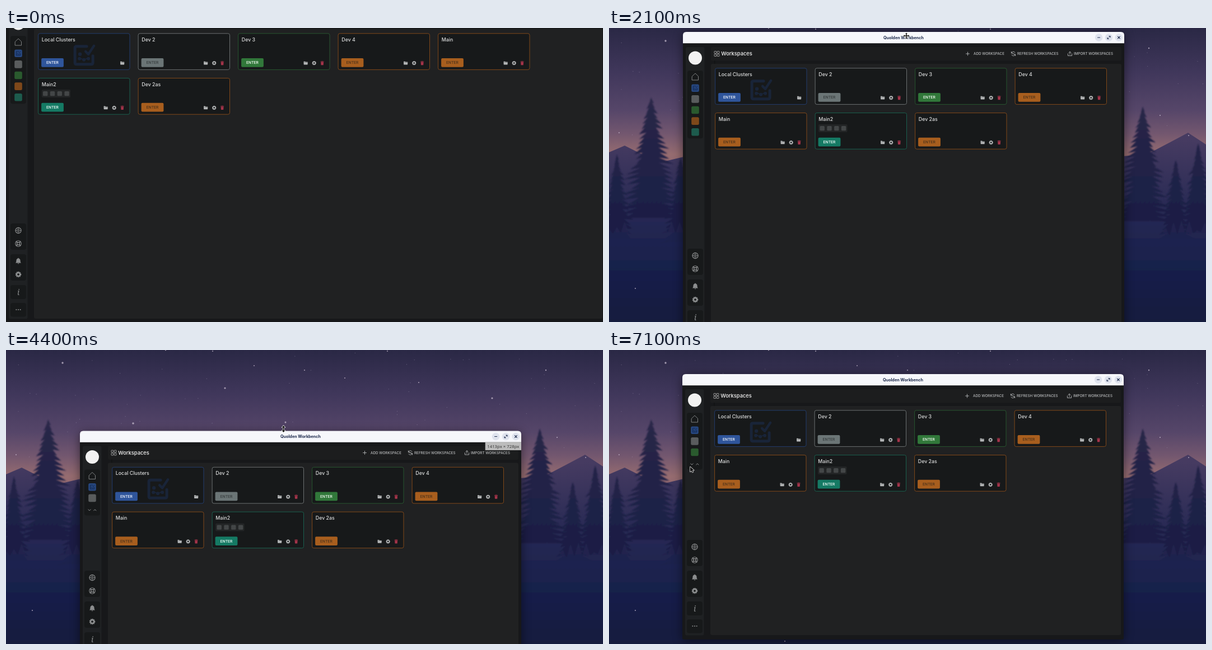
An HTML page for the animation above (8000 ms loop, 1066 by 525 pixels).

```html
<!DOCTYPE html>
<html lang="en">
<head>
<meta charset="utf-8">
<title>Workspaces</title>
<style>
html, body { margin: 0; width: 100%; height: 100%; overflow: hidden; background: #161718; }
svg { display: block; width: 100vw; height: 100vh; }
text { font-family: Inter, sans-serif; white-space: pre; }
</style>
</head>
<body>
<svg viewBox="0 0 1066 525" preserveAspectRatio="none">
  <defs>
    <linearGradient id="sky" x2="0" y2="1">
      <stop offset="0" stop-color="#2a2845"/>
      <stop offset=".15" stop-color="#40375b"/>
      <stop offset=".28" stop-color="#564669"/>
      <stop offset=".36" stop-color="#73576f"/>
      <stop offset=".43" stop-color="#966c70"/>
      <stop offset=".5" stop-color="#8c6570"/>
    </linearGradient>
    <linearGradient id="hill" gradientUnits="userSpaceOnUse" x1="0" y1="200" x2="0" y2="525">
      <stop offset="0" stop-color="#463b61"/>
      <stop offset=".35" stop-color="#2a2b55"/>
      <stop offset=".65" stop-color="#1a214d"/>
      <stop offset="1" stop-color="#121a3e"/>
    </linearGradient>
    <linearGradient id="pine" gradientUnits="userSpaceOnUse" x1="0" y1="125" x2="0" y2="480">
      <stop offset="0" stop-color="#2a2748"/>
      <stop offset=".5" stop-color="#1d2046"/>
      <stop offset="1" stop-color="#141b42"/>
    </linearGradient>
    <filter id="soft"><feGaussianBlur stdDeviation=".9"/></filter>
    <filter id="shade" x="-10%" y="-10%" width="120%" height="120%"><feGaussianBlur stdDeviation="9"/></filter>
  </defs>
  <g id="back"></g>
  <g id="scene"></g>
</svg>
<script>
const LOOP = 8000, W = 788, BOTTOM = 572, FULL_W = 1070, FULL_H = 582;
const lerp = (a, b, p) => a + (b - a) * p;

// Markup helpers
const rect = (x, y, w, h, fill, r = 0, more = '') =>
  `<rect x="${x}" y="${y}" width="${w}" height="${h}" rx="${r}" fill="${fill}" ${more}/>`;
const text = (x, y, s, size, fill, weight = 500, more = '') =>
  `<text x="${x}" y="${y}" font-size="${size}" fill="${fill}" font-weight="${weight}" ${more}>${s}</text>`;
const at = (x, y, body) => `<g transform="translate(${x} ${y})">${body}</g>`;
const disc = (x, y, r, fill, more = '') => `<circle cx="${x}" cy="${y}" r="${r}" fill="${fill}" ${more}/>`;
const line = (d, color, w = 1) =>
  `<path d="${d}" fill="none" stroke="${color}" stroke-width="${w}" stroke-linecap="round" stroke-linejoin="round"/>`;
const shape = (d, fill, more = '') => `<path d="${d}" fill="${fill}" ${more}/>`;
const ring = (r, color, w, more = '') => disc(0, 0, r, 'none', `stroke="${color}" stroke-width="${w}" ${more}`);

function random(seed) {
  return () => (seed = (seed * 16807) % 2147483647) / 2147483647;
}

// Backdrop
function pine(x, top, h, half, rnd) {
  const n = Math.round(h / 9), left = [], right = [];
  for (let i = 1; i <= n; i++) {
    const reach = half * Math.pow(i / n, .8), y = top + h * i / n;
    const a = reach * (.75 + .4 * rnd()), b = reach * (.75 + .4 * rnd());
    right.push(`${x + a} ${y + 2}`, `${x + b * .5} ${y}`);
    left.unshift(`${x - a * .5} ${y}`, `${x - b} ${y + 3}`);
  }
  return shape(`M${x} ${top}L${right.join(' ')} ${left.join(' ')}Z`, 'url(#pine)');
}

function backdrop() {
  const rnd = random(41);
  let s = rect(0, 0, 1066, 525, 'url(#sky)');
  s += shape('M0 222L28 210 60 226 100 238 150 226V525H0ZM150 230H900L960 226 1000 205 1034 187 1066 208V525H150Z', 'url(#hill)');
  let wood = 'M0 525V290';
  for (let x = 0; x <= 1066; x += 9) wood += `L${x} ${283 + 22 * rnd()}L${x + 5} ${302 + 10 * rnd()}`;
  let trees = shape(wood + 'V525Z', 'url(#hill)');
  for (const [x, y, h, w] of [[14, 226, 150, 34], [75, 124, 215, 58], [128, 232, 150, 36],
    [953, 140, 205, 54], [1012, 236, 140, 34], [1052, 206, 160, 38]]) trees += pine(x, y, h, w, rnd);
  let shore = 'M0 525V352';
  for (let x = 0; x <= 1066; x += 14) shore += `L${x} ${340 + 24 * rnd()}L${x + 7} ${362 + 10 * rnd()}`;
  trees += shape(shore + 'V525Z', 'url(#hill)', 'opacity=".75"');
  s += `<g filter="url(#soft)">${trees}</g>`;
  const stars = [[101, 23, 1.7], [391, 68, 1.6], [227, 131, 1.8], [868, 86, 1.6], [964, 36, 1.2], [285, 0, 1.2],
    [533, 36, 1.1], [499, 129, 1.5], [605, 50, 1], [443, 28, 1], [737, 58, 1.1], [47, 465, 1.1],
    [169, 283, 1], [18, 187, 1], [984, 156, 1.1], [1035, 192, 1], [314, 520, 1.1], [681, 2, 1], [369, 2, 1]];
  for (const [x, y, r] of stars) s += disc(x, y, r, '#c9bdd0', 'opacity=".75"');
  for (let i = 0; i < 60; i++) s += disc(1066 * rnd(), 200 * rnd(), .6, '#b9aec8', 'opacity=".4"');
  return s;
}

// Icons, centred on 0,0
const GREY = '#8b8d8e', PALE = '#b4b6b7';
const folder = shape('M-3.6-2.9h2.6l.9.9h3.7v.8h-7.2zM-3.7-.9h7.5l-.4 3.8h-6.7z', PALE);
const cog = (r, w, color) => ring(r, color, w) + ring(r + w * .55, color, w * .6, `stroke-dasharray="${r * .55} ${r * .4}"`);
const trash = shape('M-3-3.1h1.8l.4-.6h1.6l.4.6H3v1h-6zM-2.5-1.6h5L2.1 3.7h-4.2z', '#a5344a');
const home = line('M-5.5-.8L0-6 5.5-.8V6h-11z', GREY, .9);
const brain = ring(5.1, GREY, 1.1) + line('M0-5V5M-4.8 0h3M1.8 0h3M-2.6-2.8l1.4 1.4M2.6-2.8L1.2-1.4M-2.6 2.8l1.4-1.4M2.6 2.8L1.2 1.4', GREY);
const helm = ring(5.2, GREY, 1.1) + ring(2.4, GREY, 1.1) +
  line('M-1.7-1.7l-2-2M1.7-1.7l2-2M-1.7 1.7l-2 2M1.7 1.7l2 2', GREY, 1.6);
const bell = shape('M-5 3.2C-3.4 2-3.7-.5-3.5-1.6-3.2-3.5-2-4.4-.7-4.7V-5.5H.7v.8C2-4.4 3.2-3.5 3.5-1.6 3.7-.5 3.4 2 5 3.2zM-1.5 4h3q-1.5 2.2-3 0z', GREY);
const info = text(0, 4.6, 'i', 14, GREY, 400, 'text-anchor="middle" font-style="italic" style="font-family:\'Noto Serif\',serif"');
const dots = [-3.6, 0, 3.6].map(x => disc(x, 0, 1, GREY)).join('');
const tiles = [-2.6, 2.6].map(x => [-2.6, 2.6].map(y =>
  rect(x - 1.9, y - 1.9, 3.8, 3.8, 'none', .5, 'stroke="#b5b5b5" stroke-width=".8"')).join('')).join('');
const bot = (k, color) => `<g transform="scale(${k})">` +
  line('M5-16H-13q-3 0-3 3V13q0 3 3 3H13q3 0 3-3V1', color, 5) +
  line('M3-7l5 5L18-17', color, 4.5) + line('M-7 5L0 8 7 5', color, 2) +
  disc(-7, -2, 3.2, color) + disc(-8, 6, 3, color) + disc(0, 8, 3, color) + disc(8, 6, 3, color) + '</g>';
const plus = line('M-3 0h6M0-3v6', PALE, .9);
const refresh = line('M-3.4-1.2A3.5 3.5 0 0 1 3-2M3.4 1.2A3.5 3.5 0 0 1-3 2M-3.6-3.6v2.5h2.4M3.6 3.6V1.1H1.2M-1.2 0h2.4', PALE, .9);
const upload = line('M-3.6 0v3.5h7.2V0M0 1.4v-5M-2-1.8L0-3.8 2-1.8', PALE, .9);

const cursors = {
  move: 'M0-5.4l2 2.2H.7v2.5h2.5V-2l2.2 2-2.2 2V.7H.7v2.5H2L0 5.4l-2-2.2h1.3V.7h-2.5V2L-5.4 0l2.2-2v1.3h2.5v-2.5H-2z',
  ns: 'M0-6l3 3.4H.9v5.2H3L0 6l-3-3.4h2.1v-5.2H-3z',
  arrow: 'M0 0v9l2.2-2 1.5 3.2 1.6-.7-1.5-3.2h3z'
};

// Workspaces: name, border, button, label
const AMBER = ['#80481a', '#a85e1e', '#53361b'];
const spaces = [
  ['Local Clusters', '#233c6c', '#2f559b', '#e6ebf5'],
  ['Dev 2', '#6b7071', '#6b7576', '#3b4142'],
  ['Dev 3', '#285530', '#31783a', '#e6f2e6'],
  ['Dev 4', ...AMBER],
  ['Main', ...AMBER],
  ['Main2', '#1a5f4e', '#157a64', '#e2f3ee'],
  ['Dev 2as', ...AMBER]
];
const swatches = ['#27477f', '#595c5d', '#2a5a2e', '#7e481a', '#1d5b4d'];

function card([name, border, button, label], i, cols) {
  let s = rect(0, 0, 163.4, 64.6, '#17191a', 3, `stroke="${border}"`);
  if (!i) s += at(81.5, 39, bot(1, '#192438'));
  s += text(6.2, 14.2, name, 8.8, '#dcdddd');
  if (name === 'Main2') {
    s += rect(6, 20.5, 51.5, 14, '#232526', 2);
    for (let k = 0; k < 4; k++) s += rect(8.4 + 12.8 * k, 23.3, 8.4, 8.4, '#434647', 1.5);
  }
  s += rect(5.5, 44.2, 39.8, 15.8, button, 2) +
    text(25.4, 54.5, 'ENTER', 6.7, label, 600, 'text-anchor="middle"');
  s += i ? at(120.5, 52.8, folder) + at(135.6, 52.8, cog(2.3, 1.7, PALE)) + at(150, 52.8, trash) : at(150, 52.8, folder);
  return at(57.6 + 178.5 * (i % cols), 64.8 + 79.8 * Math.floor(i / cols), s);
}

function sidebar(h, shown) {
  const last = 100.3 + 19.6 * (shown - 1), all = shown === swatches.length;
  let s = rect(5, 27, 33.5, h - 34.5, '#1f2123', 3) + disc(22, 46.5, 12, '#f2f2f2');
  s += rect(8, 69, 28, last - 69 + (all ? 11.5 : 31), '#17191a', 4) + at(22, 80, home);
  for (let i = 0; i < shown; i++) s += rect(15.2, 93.5 + 19.6 * i, 13.6, 13.6, swatches[i], 2.5);
  s += at(22, 100.3, bot(.22, '#122a55'));
  if (!all) s += line(`M14.8 ${last + 20.3}l2.2 2.2 2.2-2.2M24.6 ${last + 22.5}l2.2-2.2 2.2 2.2`, GREY);
  for (const [top, size] of [[178, 47], [123, 47], [68, 25], [36, 24.5]]) s += rect(8, h - top, 28, size, '#17191a', 4);
  [[165.5, brain], [142, helm], [110.7, bell], [87, cog(3.1, 2.6, GREY)], [55, info], [24, dots]]
    .forEach(([up, icon]) => s += at(22, h - up, icon));
  return s;
}

const pen = document.createElement('canvas').getContext('2d');
function sizeTip(w, size) {
  const label = `1413px × ${size}px`;
  pen.font = '7.8px "Noto Sans"';
  const tw = pen.measureText(label).width;
  return rect(w - tw - 7, 20, tw + 7, 14.4, '#bcbcbc') +
    text(w - tw - 3.5, 30, label, 7.8, '#3a3a3a', 400, 'style="font-family:\'Noto Sans\',sans-serif"');
}

function titleBar(w) {
  const ink = '#1d2a4c';
  let s = shape(`M0 20.3V6q0-6 6-6H${w - 6}q6 0 6 6V20.3z`, '#f6f7fb');
  s += text(w / 2, 12.7, 'Quolden Workbench', 7.2, ink, 700, 'text-anchor="middle"');
  for (const x of [45.4, 27.5, 9.6]) s += disc(w - x, 10, 6.8, '#dfe3ee');
  s += at(w - 45.4, 10, line('M-2 0h4', ink, 1.2));
  s += at(w - 27.5, 10, line('M.3-2.4h2.2v2.2M-.3 2.4h-2.2V.2M2.3-2.2L.8-.7M-2.3 2.2L-.8.7', ink, 1));
  return s + at(w - 9.6, 10, line('M-1.9-1.9l3.8 3.8M1.9-1.9l-3.8 3.8', ink, 1.2));
}

function appWindow(w, h, cols, shown, tip) {
  let s = rect(0, 12, w, h - 12, '#17181a', 3) + titleBar(w) + sidebar(h, shown);
  s += rect(50, 27, w - 55, 24.5, '#1c1d1e', 3) + rect(56, 51, 1.5, 7, '#111213');
  s += at(60.5, 39, tiles) + text(68.3, 42.4, 'Workspaces', 9.2, '#dedede', 600);
  for (const [x, icon, label] of [[269, plus, 'ADD WORKSPACE'], [191, refresh, 'REFRESH WORKSPACES'], [90, upload, 'IMPORT WORKSPACES']])
    s += at(w - x - (icon === plus ? 10.5 : 7), 39, icon) + text(w - x, 41.4, label, 6.3, '#b9bbbc');
  s += rect(50, 57, w - 55, h - 65, '#202122', 3);
  spaces.forEach((space, i) => s += card(space, i, cols));
  return s + (tip ? sizeTip(w, tip) : '');
}

// Timeline
const heightAt = y => Math.round(975 - (y - 7) / .5577);
const resize = (t, y, cx, cy, prev = y) => ({ t, y, prev, tip: heightAt(prev), cur: ['ns', cx, cy] });
const tops = [7, 11, 19, 38, 62, 86, 104], grips = [12, 26, 47, 72, 94, 101];

const steps = [
  { t: 0, full: true },
  ...[.65, .82, .91, .96, .985, .995, 1].map((p, i) =>
    ({ t: 1100 + 100 * i, p, tip: 975, cur: i && ['move', 531, 14] })),
  { t: 2100, cur: ['move', 531, 14] },
  ...[1, 2, 3, 4, 5, 6, 7].map(i => {
    const y = 14 - 10 * i / 7;
    return { t: 2200 + 100 * i, cur: [y < 8 ? 'ns' : 'move', 531 - 17 * i / 7, y] };
  }),
  ...grips.map((cy, i) => resize(3200 + 100 * i, tops[i + 1], 513 - (i > 1 ? 3 * (i - 1) : 0), cy, i < 5 ? tops[i] : tops[6])),
  resize(4400, 144.5, 495.5, 141),
  resize(5100, 109, 498, 106),
  resize(5900, 98, 500, 95),
  { t: 7100, x: 131, y: 43, prev: 98, cur: ['arrow', 145, 208.5] }
];

const itemsFor = y => y < 55 ? 5 : y < 80 ? 4 : y < 125 ? 3 : 2;

function draw({ full, p = 1, x = 132, y = 7, prev = y, tip, cur }) {
  const maximized = at(0, -55, appWindow(FULL_W, FULL_H, 5, 5));
  if (full) return rect(0, 0, 1066, 525, '#161718') + maximized;
  const h = BOTTOM - prev;
  const bx = lerp(0, x, p), by = lerp(-55, y, p), bw = lerp(1080, W, p), bh = lerp(FULL_H, h, p);
  let s = rect(bx, by + 3, bw, bh, '#000', 6, 'opacity=".5" filter="url(#shade)"');
  s += `<g transform="translate(${bx} ${by}) scale(${bw / W} ${bh / h})">${appWindow(W, h, 4, itemsFor(prev), tip)}</g>`;
  if (p < 1) {
    const sx = bw / 1073, sy = bh / FULL_H;
    s += `<clipPath id="frame">${rect(bx, by, bw, bh, '#000')}</clipPath><g clip-path="url(#frame)" opacity="${1 - p}">` +
      `<g transform="matrix(${sx} 0 0 ${sy} ${bx + 12 * sx} ${by + 18.5 * sy})">${maximized}</g></g>`;
  }
  if (cur) s += at(cur[1], cur[2], shape(cursors[cur[0]], '#111', 'stroke="#fff" stroke-width="1.3" stroke-linejoin="round" paint-order="stroke"'));
  return s;
}

const scene = document.getElementById('scene');
document.getElementById('back').innerHTML = backdrop();
let shownStep = null;

function frame() {
  const t = performance.now() % LOOP;
  const step = steps.findLast(s => s.t <= t);
  if (step !== shownStep) {
    scene.innerHTML = draw(step);
    shownStep = step;
  }
  requestAnimationFrame(frame);
}
frame();
</script>
</body>
</html>
```
